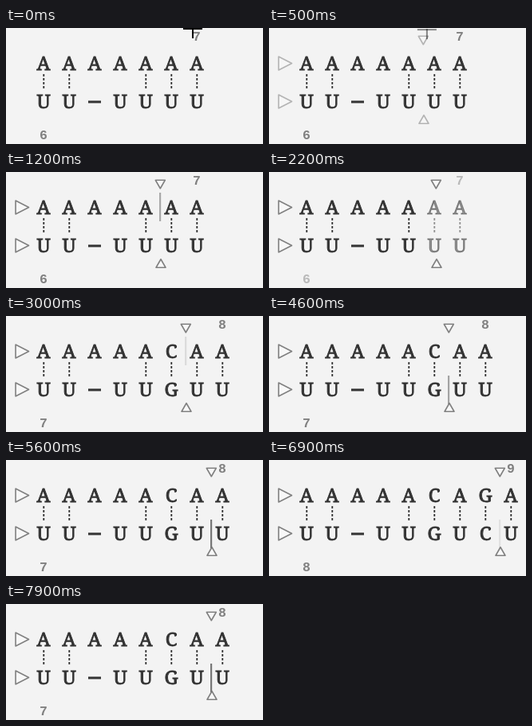
These frames come from a looping animation (322 px wide and 146 px high, 8000 ms). An HTML page with a canvas:

```html
<!DOCTYPE html>
<html lang="en">
<head>
<meta charset="utf-8">
<title>Base pair insertion</title>
<style>
  html, body { margin: 0; width: 100%; height: 100%; overflow: hidden; background: #f3f3f3; }
  canvas { display: block; width: 322px; height: 146px; }
</style>
</head>
<body>
<canvas id="stage"></canvas>
<script>
const WIDTH = 322, HEIGHT = 146, LOOP = 8000, STEP = 100;
const PITCH = 32, FIRST = 47, TOP_LINE = 53, BOTTOM_LINE = 101;
const PAPER = '#f3f3f3', INK = '#333', GREY = '#808080';
const stages = [
  { top: 'AAAAAAA', bottom: 'UU-UUUU' },
  { top: 'AAAAACAA', bottom: 'UU-UUGUU' },
  { top: 'AAAAACAGA', bottom: 'UU-UUGUCU' },
];

const canvas = document.getElementById('stage');
const ctx = canvas.getContext('2d');
const ratio = window.devicePixelRatio || 1;
canvas.width = WIDTH * ratio;
canvas.height = HEIGHT * ratio;

const columnX = i => FIRST + i * PITCH;
const ramp = (t, from, to) => Math.min(1, Math.max(0, (t - from) / (to - from)));
const ease = (t, from, to) => (1 - Math.cos(Math.PI * ramp(t, from, to))) / 2;
const pulse = (t, start) => ramp(t, start, start + 500) - ramp(t, start + 700, start + 1000);

function letter(char, x, y) {
  if (char === '-') return ctx.fillRect(x - 8, y - 9.5, 16, 3);
  ctx.fillText(char, x, y);
  ctx.strokeText(char, x, y);
}

function column({ top, bottom }, i) {
  const x = columnX(i);
  ctx.fillStyle = ctx.strokeStyle = INK;
  ctx.font = '24px "Noto Serif", serif';
  ctx.lineWidth = 0.9;
  letter(top[i], x, TOP_LINE);
  letter(bottom[i], x, BOTTOM_LINE);
  if (i === 2 || i === 3) return;
  ctx.lineWidth = 1.8;
  ctx.setLineDash([3, 2]);
  ctx.beginPath();
  ctx.moveTo(x + 0.3, 58);
  ctx.lineTo(x + 0.3, 76);
  ctx.stroke();
  ctx.setLineDash([]);
}

function label(value, x, y, scale) {
  ctx.fillStyle = GREY;
  ctx.font = `bold ${16.5 * scale}px "Liberation Mono", monospace`;
  ctx.fillText(value, x, y + 5.5 * scale);
}

// Isosceles triangle centred on (x, y), its tip pointing along the angle
function triangle(x, y, length, width, angle) {
  ctx.save();
  ctx.translate(x, y);
  ctx.rotate(angle);
  ctx.beginPath();
  ctx.moveTo(length / 2, 0);
  ctx.lineTo(-length / 2, -width / 2);
  ctx.lineTo(-length / 2, width / 2);
  ctx.closePath();
  ctx.fillStyle = '#f8f8f8';
  ctx.strokeStyle = GREY;
  ctx.lineWidth = 1.6;
  ctx.lineJoin = 'round';
  ctx.fill();
  ctx.stroke();
  ctx.restore();
}

function caret(x, y, alpha) {
  ctx.globalAlpha = alpha;
  ctx.fillStyle = '#777';
  ctx.fillRect(x - 1, y, 2.2, 36);
}

function pointer(t) {
  const progress = ramp(t, 0, 900);
  const x = 234 - 65 * progress, y = 2 * progress;
  ctx.globalAlpha = 1 - progress;
  ctx.fillStyle = '#000';
  ctx.fillRect(x - 12, y, 24, 2);
  ctx.fillRect(x - 1, y, 2, 13);
}

function draw(t) {
  const undone = t >= 7800;
  const index = t < 2500 ? 0 : t < 5700 || undone ? 1 : 2;
  const stage = stages[index];
  const last = stage.top.length - 1;
  const swap = 1 - ramp(t, 2000, 2400) + ramp(t, 2500, 2800);

  ctx.setTransform(ratio, 0, 0, ratio, 0, 0);
  ctx.globalAlpha = 1;
  ctx.fillStyle = PAPER;
  ctx.fillRect(0, 0, WIDTH, HEIGHT);
  ctx.textAlign = 'center';

  for (let i = 0; i <= last; i++) {
    ctx.globalAlpha = i < 5 ? 1 : swap;
    column(stage, i);
  }

  const settle = index === 0 || undone ? 1 : index === 1 ? ramp(t, 2500, 2800) : ramp(t, 5700, 6500);
  const scale = 1.15 - 0.15 * settle;
  ctx.globalAlpha = swap;
  label(7 + index, columnX(last), 10, scale);
  label(6 + index, FIRST, 134.5, scale);

  const undo = undone ? 1 : 0;
  const shift = ease(t, 2000, 2400) + ease(t, 4600, 4900) + ease(t, 5600, 5900) - undo;
  const x = 193 + PITCH * shift;
  ctx.globalAlpha = ramp(t, 0, 900);
  for (const y of [44.5, 92.5]) triangle(20.3, y, 16.5, 17, 0);
  triangle(x + 0.3, 15.5, 10.5, 12, Math.PI / 2);
  triangle(x + 1, 115, 10.5, 12, -Math.PI / 2);

  const dim = ramp(t, 6700, 6900) - ramp(t, 7000, 7400);
  caret(x, 26, pulse(t, 900) + pulse(t, 2900));
  caret(x, 75, ramp(t, 3900, 5000) - 0.85 * dim);
  pointer(t);
}

const start = performance.now();
function frame() {
  const t = (performance.now() - start) % LOOP;
  draw(Math.floor(t / STEP) * STEP);
  requestAnimationFrame(frame);
}
frame();
</script>
</body>
</html>
```
